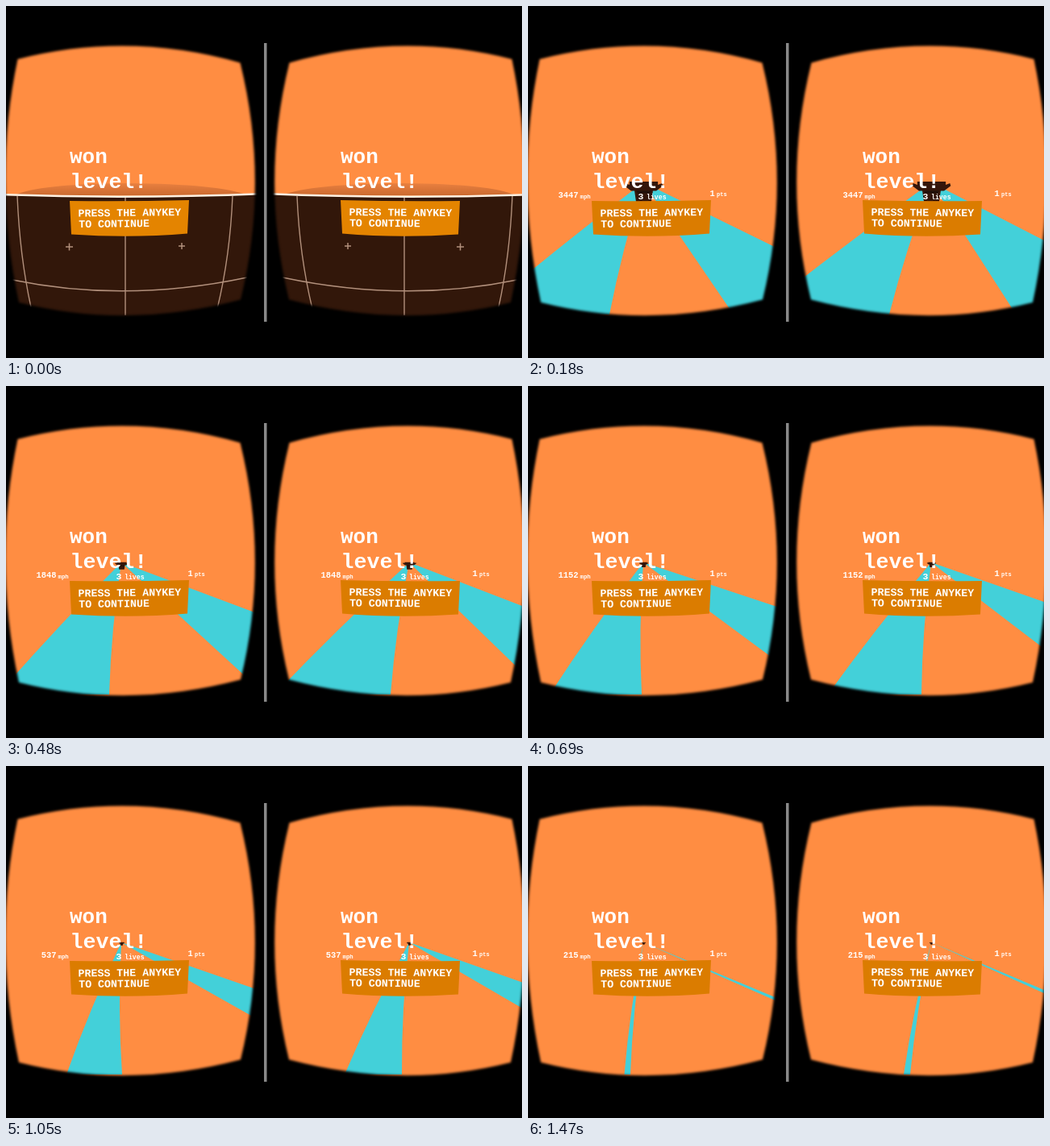
Write an HTML page with a canvas that moves like this. It is 640 px wide and 437 px high and loops after 1.5 s.

```html
<!DOCTYPE html>
<html lang="en">
<head>
<meta charset="utf-8">
<title>won level!</title>
<style>
  html, body { margin: 0; width: 100%; height: 100%; overflow: hidden; background: #000; }
  canvas { display: block; }
</style>
</head>
<body>
<canvas id="stage" width="640" height="437"></canvas>
<script>
const ctx = document.getElementById('stage').getContext('2d');
const LOOP = 1500, STEP = 30, MIRROR = 642;
const ORANGE = '#ff8d42', CYAN = '#43d0d9', DARK = '#32170a', LINE = '#b2907c';

// time, speed, then per eye: left stripe x at the bottom (outer, inner),
// right stripe y at the right side (top, bottom)
const KEYS = [
  [180, 3447, -62, 101, 298, 455, 283, 448, 291, 437],
  [480, 1848, -10, 128, 279.5, 367, 333, 477, 273, 355],
  [690, 1152, 27, 141, 272.5, 338, 372, 488, 268, 326],
  [1050, 537, 75, 144, 275, 310, 420, 491, 268.5, 300.5],
  [1320, 300, 104, 136, 282, 295, 449, 482, 275, 288.5],
  [1470, 215, 119.5, 127, 286, 290, 466, 474, 278, 282]
];

// Smooth curve through one column of KEYS, straight before the first key
function track(col, t, map = v => v) {
  const last = KEYS.length - 1;
  const value = i => map(KEYS[i][col]);
  const slope = i => {
    const a = Math.max(i - 1, 0), b = Math.min(i + 1, last);
    return (value(b) - value(a)) / (KEYS[b][0] - KEYS[a][0]);
  };
  if (t <= KEYS[0][0]) return value(0) + slope(0) * (t - KEYS[0][0]);
  let i = 0;
  while (i < last - 1 && t > KEYS[i + 1][0]) i++;
  const span = KEYS[i + 1][0] - KEYS[i][0];
  const u = (t - KEYS[i][0]) / span, w = 1 - u;
  return w * w * (1 + 2 * u) * value(i) + u * u * (3 - 2 * u) * value(i + 1)
    + span * u * w * (w * slope(i) - u * slope(i + 1));
}

function fill(path, color) {
  ctx.fillStyle = color;
  ctx.fill(new Path2D(path));
}

function stroke(path, color, width) {
  ctx.strokeStyle = color;
  ctx.lineWidth = width;
  ctx.stroke(new Path2D(path));
}

function text(str, x, y, size, align = 'left') {
  ctx.font = `bold ${size}px "Liberation Mono", monospace`;
  ctx.textAlign = align;
  ctx.fillStyle = '#fff';
  ctx.fillText(str, x, y);
}

function mirrored(eye, draw) {
  ctx.save();
  if (eye) ctx.transform(-1, 0, 0, 1, MIRROR, 0);
  draw();
  ctx.restore();
}

function room() {
  const shade = ctx.createLinearGradient(0, 220, 0, 236);
  shade.addColorStop(0, '#e98040');
  shade.addColorStop(1, '#c9692f');
  fill('M10 235Q40 221 150 220Q265 221 300 235Z', shade);
  fill('M-10 234Q150 240 321 233V400H-10Z', DARK);
  stroke('M148 237V384M14 236Q17 310 31 374M281 236Q278 310 262 376M8 340Q148 369 299 337', LINE, 1.4);
  stroke('M74 299h9M78.500 294.500v9M214 298h8M218 294v8', LINE, 1.5);
  stroke('M-10 234Q150 240 321 233', '#fff1e2', 2.5);
}

function road(eye, t) {
  const [outer, inner, top, bottom] = [2, 3, 4, 5].map(c => track(c + 4 * eye, t));
  const vx = eye ? 500 : 143, vy = 219, side = eye ? 640 : 304;
  const bend = x => `${(vx + x) / 2 - 5} ${(vy + 383) / 2}`;
  fill(`M${vx} ${vy}Q${bend(outer)} ${outer} 383L${inner} 383Q${bend(inner)} ${vx} ${vy}Z`, CYAN);
  // run the edges on past the lens border
  const far = y => vy + (y - vy) * 1.1, farX = vx + (side - vx) * 1.1;
  fill(`M${vx} ${vy}L${farX} ${far(top)}V${far(bottom)}Z`, CYAN);
}

function ship(eye, t) {
  const scale = 166 / Math.max(t - 20, 50);
  ctx.save();
  ctx.translate(eye ? 500.5 : 143.5, 219);
  ctx.scale(scale, scale);
  fill('M-17-1H17V3L22 1L23 4L15 10H11L9 24H-9L-11 10H-15L-23 4L-22 1L-17 3Z', '#34160b');
  fill('M-9 10H9L7 13H-7Z', '#21100a');
  ctx.restore();
}

function hud(eye, t) {
  const x = eye * 353;
  text(Math.round(Math.exp(track(1, t, Math.log))), 62.5 + x, 238, 10.4, 'right');
  text('mph', 64.5 + x, 239, 7.3);
  text('3', 136.5 + x, 240, 11.5);
  text('lives', 147 + x, 240, 8.2);
  text('1', 225.5 + x, 236, 10.4);
  text('pts', 234 + x, 236, 7);
}

function message(eye, panelColor) {
  ctx.save();
  ctx.translate(eye * 336, 0);
  text('won', 79, 195, 26);
  text('level!', 79.5, 225.5, 26.6);
  ctx.restore();
  mirrored(eye, () => fill('M79 242Q150 243 227 241L225 282.500Q155 288.500 81 283.500Z', panelColor));
  ctx.save();
  ctx.translate(89.5 + eye * 336, eye ? 260 : 261.5);
  ctx.rotate(eye ? 0.008 : -0.011);
  text('PRESS THE ANYKEY', 0, 0, 13.3);
  text('TO CONTINUE', 0.5, 13.5, 13.3);
  ctx.restore();
}

const lens = new Path2D('M14.500 66Q152 31 290.500 70.500Q327 218 291 364.500Q150 402 16 368Q-17 215 14.500 66Z');
const mask = new Path2D('M-60-60H700V500H-60Z');
mask.addPath(lens);
mask.addPath(lens, new DOMMatrix([-1, 0, 0, 1, MIRROR, 0]));

function render(t) {
  const inRoom = t < STEP;
  ctx.fillStyle = ORANGE;
  ctx.fillRect(0, 0, 640, 437);
  for (const eye of [0, 1]) {
    ctx.save();
    ctx.beginPath();
    ctx.rect(eye * 321, 0, 321, 437);
    ctx.clip();
    if (inRoom) {
      mirrored(eye, room);
    } else {
      road(eye, t);
      ship(eye, t);
      hud(eye, t);
    }
    message(eye, inRoom ? '#e48400' : '#db7c00');
    ctx.restore();
  }
  ctx.filter = 'blur(1.8px)';
  ctx.fillStyle = '#000';
  ctx.fill(mask, 'evenodd');
  ctx.filter = 'none';
  ctx.fillStyle = '#898989';
  ctx.fillRect(320, 46, 3.5, 346);
}

const start = performance.now();
function tick() {
  const t = (performance.now() - start) % LOOP;
  render(Math.floor(t / STEP) * STEP);
  requestAnimationFrame(tick);
}
tick();
</script>
</body>
</html>
```
